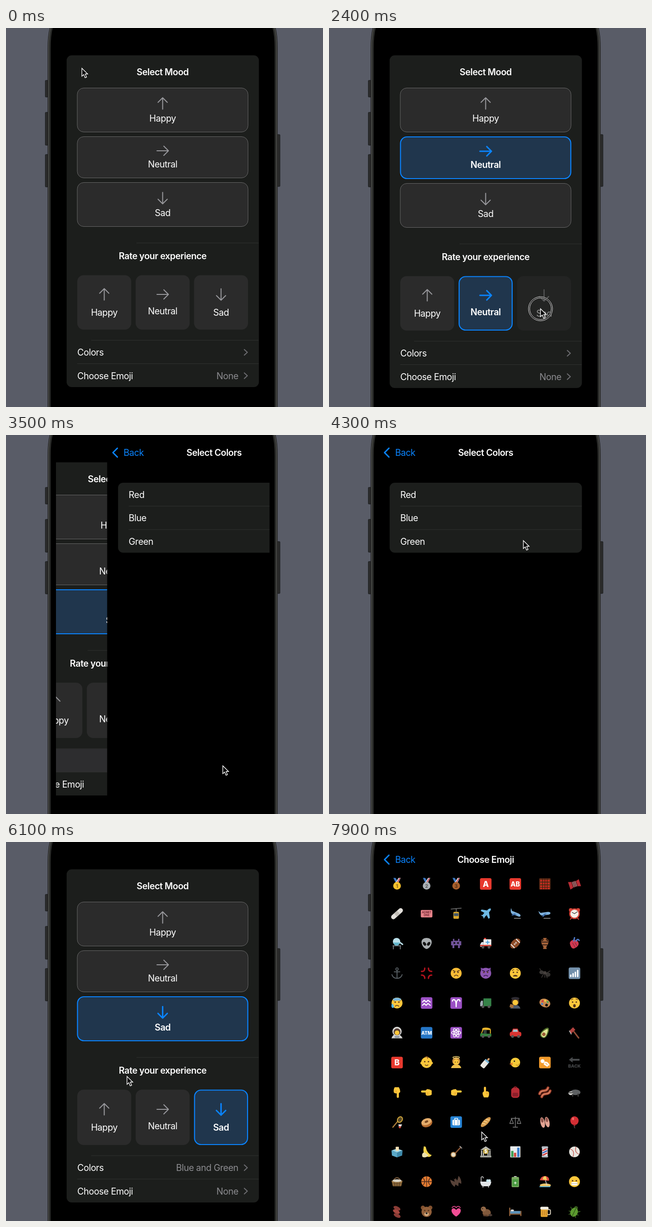
Animation of 685 by 818 pixels, one loop 8 s. Source, as an HTML page:

```html
<!DOCTYPE html>
<html lang="en">
<head>
<meta charset="utf-8">
<title>Mood picker</title>
<style>
html, body { margin: 0; height: 100%; overflow: hidden; background: #595c67; }
svg { display: block; width: 100vw; height: 100vh; }
text { font: 400 19.4px Inter, "Open Sans", sans-serif; letter-spacing: -.45px; fill: #fff; }
.bold { font-weight: 600; }
.mid { text-anchor: middle; }
.end { text-anchor: end; fill: #8c8c90; }
.blue { fill: #0a84ff; }
.icon { font-weight: 800; letter-spacing: 0; text-anchor: middle; }
.line { fill: none; stroke-linecap: round; stroke-linejoin: round; }
</style>
</head>
<body>
<svg viewBox="0 0 685 818">
  <defs><clipPath id="screen"><path d="M108 0H570V818H108Z"/></clipPath></defs>
  <g id="phone"></g>
  <g clip-path="url(#screen)">
    <g id="list"></g><g id="colors"></g><g id="emoji"></g>
  </g>
  <g id="pointer">
    <g id="ring" fill="none" stroke="#eee">
      <circle r="24.5" stroke="#111" stroke-width="4"/><circle r="26"/><circle r="23.3"/>
    </g>
    <path d="M0 0V17L4 13.4 6.9 20.4 10 19.1 7.1 12.3H12.4Z" fill="#000" stroke="#fff" stroke-width="1.4"/>
  </g>
</svg>
<script>
const $ = id => document.getElementById(id);
const p = (d, f) => `<path d="${d}" fill="${f}"/>`;
const l = (d, s, w = 2) => `<path class="line" d="${d}" stroke="${s}" stroke-width="${w}"/>`;
const e = (x, y, a, b, f) => `<ellipse cx="${x}" cy="${y}" rx="${a}" ry="${b}" fill="${f}"/>`;
const c = (x, y, a, f) => e(x, y, a, a, f);
const r = (x, y, w, h, f, rx = 1, more = '') =>
  `<rect x="${x}" y="${y}" width="${w}" height="${h}" rx="${rx}" fill="${f}" ${more}/>`;
const g = (move, body) => `<g transform="${move}">${body}</g>`;
const text = (s, x, y, cls = '') => `<text x="${x}" y="${y + 7}" class="${cls}">${s}</text>`;
const BLUE = '#0a84ff', SHEET = '#1c1e1c', RULE = '#303230', MID = 338.5;
const rule = (x, y) => r(x, y - .5, 546 - x, 1, RULE, 0);

/* phone body */
const shell = i => `M${90 + i} 830V45Q${90 + i} 15 ${95 + i} -2H${582 - i}Q${587 - i} 15 ${587 - i} 45V830Z`;
const button = (x, y, h) => r(x, y, 6, h, '#2b2b2b', 1, 'stroke="#17181a"');
$('phone').innerHTML = r(0, 0, 685, 818, '#595c67', 0) +
  button(85, 113, 36) + button(85, 182, 71) + button(85, 273, 70) + button(586, 230, 112) +
  p(shell(0), '#111') + p(shell(1), '#555653') + p(shell(2.5), '#2b2c2a') + p(shell(6.5), '#000');

/* mood list */
const MOODS = ['Happy', 'Neutral', 'Sad'];
const ARROW = 'M0 12.3V-12.3M-10 -2.5L0 -12.5L10 -2.5';
function arrow(i, x, y, on) {
  return g(`translate(${x} ${y}) rotate(${i * 90})`, l(ARROW, on ? BLUE : '#98989c', on ? 3.1 : 2.1));
}
function card(i, on, x, y, w, h, edge, iconY, textY, dim) {
  const line = on ? `stroke="${BLUE}" stroke-width="2.2"` : edge ? 'stroke="#686868"' : '';
  const pad = on ? 1 : edge ? .5 : 0, cx = x + w / 2;
  return `<g opacity="${dim ? .5 : 1}">` +
    r(x + pad, y + pad, w - 2 * pad, h - 2 * pad, on ? '#20364d' : '#2b2b2b', 14, line) +
    arrow(i, cx, iconY, on) + text(MOODS[i], cx, textY, on ? 'mid bold' : 'mid') + '</g>';
}
const chevron = y => l(`M515 ${y - 6}l6.5 6-6.5 6`, '#6c6c70', 2.2);

function listPage({ sel, press, colors, glow }) {
  const grow = sel < 0 ? 0 : sel === 1 ? 2 : 1, tall = sel === 0 || sel === 2 ? 2 : 0;
  const low = grow + tall;
  let s = r(131, 59, 415.5, 716 + low, SHEET, 11) + text('Select Mood', MID, 95, 'mid bold');
  let y = 129;
  MOODS.forEach((m, i) => {
    const on = sel === i, add = on ? grow : 0, h = (i === 1 ? 90 : 96) + add;
    s += card(i, on, 153.5, y, 370, h, true, y + (i === 1 ? 31 : 34) + add / 2, y + (i === 1 ? 60 : 66) + add / 2, press === 'top' + i);
    y += h + 9;
  });
  s += rule(282, 464 + grow) + text('Rate your experience', MID, 492 + grow, 'mid bold');
  const mid = 575 + grow + tall / 2;
  MOODS.forEach((m, i) => {
    s += card(i, sel === i, 154 + i * 126.2, 533.5 + grow, 116.6, 117.5 + tall, false,
      mid, mid + (i === 1 ? 36 : 39), press === 'rate' + i);
  });
  s += rule(184, 674 + low) + r(131, 674.5 + low, 415.5, 50, '#2d2d2f', 0, `opacity="${glow}"`) +
    rule(154, 724.5 + low) + text('Colors', 154, 700 + low) + text(colors, 502, 700 + low, 'end') + chevron(700 + low) +
    text('Choose Emoji', 154, 750.5 + low) + text('None', 502, 750.5 + low, 'end') + chevron(750.5 + low);
  return s;
}

/* pushed pages */
const navBar = (title, dim) => r(107.5, 0, 463, 818, '#000', 0) +
  `<g opacity="${dim ? .4 : 1}">` + l('M129.5 28.5L120 38 129.5 47.5', BLUE, 3) + text('Back', 143, 38, 'blue') + '</g>' +
  text(title, MID, 38, 'mid bold');

function colorPage({ press, green, blue }) {
  const tick = y => l(`M505 ${y + 1}l5.5 6 9.5-14`, BLUE, 2.2);
  const row = { green: 204, blue: 153.5 }[press];
  return navBar('Select Colors', press === 'back') + r(131, 103, 415.5, 151, SHEET, 11) +
    (row ? r(131, row, 415.5, 50, '#2d2d2f', 8) : '') + rule(154, 153.5) + rule(154, 204) +
    ['Red', 'Blue', 'Green'].map((s, i) => text(s, 154, 129 + i * 50.4)).join('') +
    (blue ? tick(179) : '') + (green ? tick(229.5) : '');
}

/* emoji, each drawn around 0,0 */
const GOLD = '#fdc73b', INK = '#54351d';
const t = (s, size, f, y) => `<text class="icon" y="${y}" style="font-size:${size}px;fill:${f}">${s}</text>`;
const eyes = c(-4, -2, 1.6, INK) + c(4, -2, 1.6, INK);
const face = (more, f = GOLD) => c(0, 0, 11.8, f) + eyes + more;
const badge = (f, more) => r(-12.5, -12.5, 25, 25, f, 3.5) + more;
const medal = (f, n) => p('M-8-13h5L3-3H-3Z', '#3c79c4') + p('M8-13H3L-3-3H3Z', '#d6e0ea') + l('M6-12L1-4', '#d0434d', 2) + c(0, 4, 8.3, f) + t(n, 10, '#0007', 8);
const wheels = c(-6, 8, 3, '#555') + c(7, 8, 3, '#555');
const hand = turn => g(`rotate(${turn})`, r(-4, -12, 4.6, 16, GOLD, 2.3) + p('M-4-2L-7 1Q-7 6-4 11H5Q8 7 7 0 5-3 0-2Z', GOLD) + l('M1.5 0v4M4.5 1v3', '#d9952b', 1));
const ball = (f, line, d) => c(0, 0, 11.5, f) + l(d, line, 1.3);
const person = (hair, coat) => p('M-11 12Q-9 4 0 4T11 12Z', coat) + c(0, -3, 8.5, hair) + c(0, -1, 6, GOLD);
const jet = p('M11-11Q7-12 3-7L-9-9-11-6-3-2-7 3-11 3-6 6-4 11-2 7 2 3 6 11 9 9 7-3Q12-8 11-11Z', '#6db9e4');
const sideJet = turn => g(`rotate(${turn})`, p('M-13-8L-9-3H7Q13-2 12 1T4 3H-7Q-12 1-13-8Z', '#7fb2dc') + p('M-2 0H4L-4 6H-7Z', '#3f6fae')) + r(-3, 9, 15, 2, '#777');
const heart = f => p('M0 11C-22-3-8-18 0-6 8-18 22-3 0 11Z', f);
const icons = [];
const add = (...row) => icons.push(...row);

add(medal('#f6c02c', 1), medal('#aab0b5', 2), medal('#a85e2b', 3),
  badge('#e8392e', t('A', 17, '#fff', 6)), badge('#e8392e', t('AB', 14, '#fff', 5)),
  r(-12, -12, 24, 24, '#6b2f18', 1) + l('M-9-7H9M-9-1H9M-9 5H9M-9 10H9', '#c92c20', 3) + l('M-5-11V11M0-11V11M5-11V11', '#3b1b10', 1.2),
  g('rotate(-18)', p('M-12-8L-5-6V7L-12 9Z', '#b92d35') + p('M12-7L5-5V7L12 9Z', '#b92d35') + r(-5, -6, 10, 13, '#5d1a20') + l('M-3-5V6M0-5V6M3-5V6', '#d9cac2', 1)));
add(g('rotate(-42)', r(-15.5, -4.8, 31, 9.6, '#e3e0db', 4.8) + r(-4.5, -4.5, 9, 9, '#c3bfb8')),
  r(-12.5, -8, 25, 16, '#e8848b', 2) + t('ADMIT', 6, '#7d2f3a', -1) + t('ONE', 6, '#7d2f3a', 5),
  l('M-11-10L11-12M0-10V-3', '#777', 1.6) + r(-6, -4, 12, 15, '#d9a72b', 2) + r(-5, -1, 10, 6, '#44586b'),
  jet, sideJet(22), sideJet(-8),
  c(-8, -8, 4, '#d34236') + c(8, -8, 4, '#d34236') + l('M-7 10L-9 12M7 10L9 12', '#d34236', 2) + c(0, 0, 11.5, '#d34236') + c(0, 0, 8.8, '#f3efe8') + l('M0 0L-5-3M0 0L6-4', '#333', 1.3));
add(c(-1, -4, 8, '#b9dfe9') + l('M5-3L12 2', '#b9dfe9', 3) + p('M-8-2H6Q4 5-1 5T-8-2Z', '#63b5cb') + l('M-9 5H8M-8 5V12M7 5V12', '#8c9298', 1.5),
  p('M0 12C-6 11-11 3-11-3-11-15 11-15 11-3 11 3 6 11 0 12Z', '#a9aeb0') + g('rotate(-35)', e(-4, -2, 3, 4.5, '#151515')) + g('rotate(35)', e(4, -2, 3, 4.5, '#151515')),
  p('M-7-10h3v4H4v-4h3v5h4v9H8v6H4V4H-4v6H-8V4h-3V-5h4Z', '#705398') + c(-4, -1, 2, '#111') + c(4, -1, 2, '#111'),
  r(-5, -9, 17, 15, '#eee') + p('M-5-3H-9L-12 2V7H-5Z', '#d9e1e6') + r(-12, 3, 24, 3, '#e0463a', 0) + l('M4-6V1M.5-2.5H7.5', '#4aa2dc', 2) + r(-4, -12, 5, 3, '#e0463a') + wheels,
  g('rotate(-45)', e(0, 0, 13, 8, '#8d4a26') + l('M-8-5V5M8-5V5', '#eee', 2) + l('M-4 0H4M-2-2V2M2-2V2', '#eee', 1)),
  p('M-4-12H4L2-8Q9-5 7 1L3 8 4 12H-4L-3 8-7 1Q-9-5-2-8Z', '#a4633a') + l('M-6-3H6M-5 3H5', '#38231a', 1.8) + l('M-3-9Q-9-9-7-2M3-9Q9-9 7-2', '#784425', 1.5),
  g('rotate(15)', p('M-7-5C0-12 13-5 8 4 4 11-1 14-6 8S-11 0-7-5Z', '#d03a50') + l('M-3-5V-12M2-6Q4-13 8-9', '#4b76c0', 3) + l('M-4 0L4 8M1-2L6 3', '#802640', 1.2)));
add(l('M0-6V11M-6-3H6M-11 3Q-9 11 0 11T11 3', '#565d62', 2) + '<circle cy="-9" r="2.6" fill="none" stroke="#565d62" stroke-width="1.8"/>',
  l('M-11-4Q-4-3-4-11M4-11Q4-4 11-4M11 4Q4 4 4 11M-4 11Q-4 4-11 4', '#b3131d', 3),
  face(l('M-4 6Q0 2 4 6M-7-6L-2-4M7-6L2-4', INK, 1.6), '#f9bb35'),
  p('M-11-12Q-5-11-2-8L-10-3ZM11-12Q5-11 2-8L10-3Z', '#74449b') + face(l('M-4 6Q0 3 4 6M-7-6L-2-4M7-6L2-4', '#301747', 1.7), '#8c56b1'),
  face(l('M-4 6Q0 3 4 6Z', INK, 2) + l('M-7-6L-3-8M7-6L3-8', INK, 1.3)),
  e(-7, -2, 5, 4, '#3a3735') + c(0, -1, 3.5, '#443f3c') + e(7, 3, 5, 4.5, '#33312f') + l('M-2 0L-7 9M0 0V9M2 0L5 10M-8-5L-11-10M3 0L11-5', '#4a4542', 1.3),
  badge('#7390ab', l('M-8 7V4M-3 7V1M2 7V-2M7 7V-6', '#fff', 3.2)));
add(face(l('M-4 7Q0 3 4 7M-7-5L-2-8M7-5L2-8', INK, 1.6) + p('M-11 10Q-14 6-10 1-6 6-7 9T-11 10Z', '#51b4ea') + p('M-9-9Q0-14 9-9L7-5H-7Z', '#7ab6db')),
  badge('#9b50c4', l('M-9-2L-5-6-1-2 3-6 8-2M-9 5L-5 1-1 5 3 1 8 5', '#fff', 2.2)),
  badge('#9b50c4', l('M-8-4Q-8-8-4-7T0 8Q0-6 4-7T8-4', '#fff', 2.4)),
  r(-5, -10, 17, 17, '#358248') + p('M-12 0L-10-5H-6V7H-12Z', '#9fabb1') + wheels,
  person('#49321f', '#505b6b') + e(0, -10, 9, 3, '#2e2b32') + g('translate(-8 7) rotate(15)', r(-4, -4, 8, 7, '#a9713a')),
  g('rotate(20)', e(0, 0, 12, 9, '#c98a50') + c(-6, -2, 2.2, '#d83c38') + c(-1, -5, 2.2, '#f4d23d') + c(5, -4, 2.2, '#47a95a') + c(-5, 4, 2.2, '#3f7ed0') + c(5, 3, 3, '#111')),
  face(e(0, 6, 2.8, 3.4, INK) + l('M-7-7L-3-9M7-7L3-9', INK, 1.3)));
add(p('M-12 12Q-9 2 0 3T12 12Z', '#d0d0ce') + c(0, -3, 10, '#dadad8') + c(0, -2, 7.5, '#584237') + c(0, 0, 5, GOLD) + r(-5, 7, 10, 4, '#8995a0'),
  badge('#2576c6', t('ATM', 10, '#fff', 4)),
  badge('#9b50c4', [0, 60, 120].map(a => g(`rotate(${a})`, '<ellipse rx="10" ry="4" fill="none" stroke="#fff" stroke-width="1.5"/>')).join('') + c(0, 0, 2, '#fff')),
  p('M-7-10Q2-13 10-9L11-6H-8Z', '#e9b52c') + l('M-6-7L-9 1M10-6V1', '#e9b52c', 2) + r(-5, -6, 7, 9, '#36423b') + p('M-12 2Q-8-1-5 2H12V8H-12Z', '#35833f') + wheels,
  p('M-9 0L-5-9H5L9 0Z', '#d93431') + p('M-6-1L-4-7H4L6-1Z', '#a8c4d0') + r(-12, -2, 25, 10, '#d93431', 4) + wheels,
  g('rotate(35)', p('M0-13Q5-12 7 0T0 12-7 0 0-13Z', '#53702b') + p('M0-10Q3-9 5 1T0 10-5 1 0-10Z', '#e0e596') + c(0, 4, 3.7, '#9a5b32')),
  l('M-4-6L9 11', '#8f4b36', 3.2) + p('M-11-4L-3-12 2-6-3-3-7 3Z', '#b3423f') + l('M-11-4L-7 3', '#bbb', 1.6));
add(badge('#e8392e', t('B', 17, '#fff', 6)),
  c(-11, 1, 2.5, GOLD) + c(11, 1, 2.5, GOLD) + face(l('M-3 5Q0 8 3 5', INK, 1.6) + l('M-2-12Q3-14 2-9', '#a0662d', 2)),
  person('#c98c3c', '#eec04a') + '<ellipse cy="-11" rx="7" ry="2" fill="none" stroke="#f7dc78" stroke-width="1.5"/>' + c(-2, -1, 1, INK) + c(3, -1, 1, INK),
  g('rotate(40)', r(-5.5, -4, 11, 17, '#e8e7e2', 3) + r(-5.5, -6, 11, 4, '#79b7da') + r(-2, -12, 4, 6, '#dba16d', 2)),
  c(0, 0, 10.5, '#f4c938') + p('M-6 0L-13 3-6 6Z', '#e67b2b') + c(-2, -3, 1.6, '#222') + l('M2 5Q6 8 8 3', '#d19c27', 2),
  badge('#f29b2c', c(-5, -3, 4.2, '#fff') + l('M0 0Q5-1 8 5M-1 3L5 7', '#fff', 3.5)),
  p('M-12-6L-4-12V-8H11V-4H-4V0Z', '#47494b') + t('BACK', 9.5, '#47494b', 11));
add(hand(180), g('scale(-1 1)', hand(90)), hand(90), hand(0),
  l('M-4-9Q0-15 4-9', '#8b1f2a', 2) + r(-9, -10, 18, 22, '#b72b35', 6) + r(-6, 1, 12, 8, '#8b1f2a', 2),
  g('rotate(-35)', l('M-11-4Q-6-8 0-4T11-4M-11 4Q-6 0 0 4T11 4', '#a7442f', 6) + l('M-11-4Q-6-8 0-4T11-4M-11 4Q-6 0 0 4T11 4', '#e9a27d', 1.4)),
  e(2, 0, 11, 6, '#5d6062') + e(-8, 2, 5, 4, '#d0d0ce') + l('M-11 1H-4', '#333', 2) + l('M-4 5V8M8 4V8', '#333', 3));
add(l('M1-1L-9 11', '#b0813c', 2.5) + g('rotate(35)', e(2, -8, 6, 7.5, '#d7ab3d') + e(2, -8, 4, 5.5, '#564726')) + p('M3 5L11 5 8 11H4Z', '#eee') + c(6, 11, 2.4, '#d04a3d'),
  g('rotate(-20)', e(0, 2, 12, 9, '#b66d31') + e(0, -1, 11.5, 7, '#e5ad6c') + e(0, -1, 4, 2.3, '#7a4922')),
  badge('#2583d5', r(-8, -5, 16, 12, '#fff', 2) + l('M-3-5V-8H3V-5', '#fff', 1.6) + l('M-4-4V6M4-4V6', '#2583d5', 1)),
  g('rotate(-45)', e(0, 0, 14, 5.5, '#d59a4d') + l('M-7-3L-4 2M-1-3L2 2M5-3L8 2', '#f5d28e', 2)),
  l('M0-11V10M-5 11H5M-9-8H9M-8-7L-12 3H-4ZM8-7L4 3H12Z', '#858585', 1.3),
  g('rotate(-12)', e(-5, 0, 4.8, 11.5, '#e4a493') + e(-5, -5, 2.6, 5, '#8e544b') + e(5, 1, 4.8, 11.5, '#e4a493') + e(5, -4, 2.6, 5, '#8e544b')),
  e(0, -3, 9, 9.5, '#d42e34') + p('M0 5L3 8H-3Z', '#a02028') + l('M0 8Q-2 10 1 13', '#888', 1) + e(-3, -7, 2, 3, '#ee7069'));
add(p('M-12-3L0-7 12-3 0 2Z', '#94d1e6') + p('M-12-3L0 2V12L-11 8Z', '#5aa9c8') + p('M12-3L0 2V12L11 8Z', '#3d89aa') + r(-3, -11, 7, 9, '#f1dfb5'),
  p('M-6-12L-2-11Q1 4 11 7 7 14-2 9-9 3-6-12Z', '#f4d248') + p('M-5 1Q-12 3-9 11 0 14 4 7Z', '#eee2ad'),
  l('M-4 5L10-10', '#825031', 2.8) + c(-6, 6, 6, '#b98b52') + c(-6, 6, 4, '#eadfc9') + l('M8-12L12-8', '#999', 2),
  p('M-12-4L0-12 12-4Z', '#b9bab4') + r(-12, 8, 24, 4, '#a6a79f') + l('M-9-2V7M9-2V7M-5-2V7M5-2V7', '#ccccc4', 2.5) + c(0, -1, 6, '#bda03b') + t('$', 10, '#fff', 2.5),
  r(-11, -12, 22, 24, '#e8ecef', 1) + r(-9, -2, 5, 13, '#3ca053', 0) + r(-3, 2, 5, 9, '#d54a3e', 0) + r(4, -9, 5, 20, '#3a7cca', 0),
  r(-6, -8, 12, 17, '#eee', 1) + l('M-4-3L4-7M-4 7L4 3', '#d43c3c', 3) + l('M-4 2L4-2', '#3e67bd', 3) + r(-7, -12, 14, 5, '#b4bbc4', 2) + r(-7, 8, 14, 4, '#b4bbc4', 2),
  ball('#e7e5df', '#c14a43', 'M-9-6Q1-3-3 10M3-10Q0 2 10 5'));
add(l('M-9-1Q0-16 9-1', '#806040', 1.8) + p('M-12-2H12L9 10H-9Z', '#94703f') + e(0, -2, 10, 3, '#d8d2c4') + l('M-10 4H10M-8 8H8M-5 2V9M0 2V9M5 2V9', '#573d22', 1.2),
  ball('#e57c31', '#46281d', 'M0-11V11M-11 0H11M-8-8Q0 0-8 8M8-8Q0 0 8 8'),
  g('rotate(-25)', p('M-2-8L0-5 2-8 3-1 10-9Q13 0 8 9L4 4 0 11-4 5-8 9Q-13 0-10-9L-3-1Z', '#574238')),
  l('M-10 1V-9Q-7-13-5-8', '#aaa', 2) + p('M-12 0H12Q11 10 5 10H-5Q-11 10-12 0Z', '#e2e5e7') + l('M-6 10V12M6 10V12', '#bbb', 2) + c(4, -2, 3, '#c0e2ee') + c(8, -2, 3, '#d5edf4'),
  r(-3, -12, 6, 4, '#bbb') + r(-8, -10, 16, 22, '#78a85e', 2) + r(-6, -5, 12, 15, '#4a9b42') + t('+', 11, '#dfefd9', 6),
  e(1, 8, 12, 4, '#ebc66d') + l('M0-7L4 7', '#d7d7d7', 1.5) + p('M-11-3Q-8-13 2-12 10-10 9-2Z', '#e24f42') + p('M-5-5Q-3-12 1-12 4-9 4-3Z', '#f3d361') + l('M-11 11H11', '#54add3', 2),
  face(r(-7, 1, 14, 7, '#fff', 3) + l('M-7 4.5H7', '#b8a277', 1)));
add(g('rotate(25)', e(-3, -6, 8, 4, '#8a3c36') + e(-1, 1, 8, 4, '#a5463e') + e(4, 8, 8, 4, '#8a3c36')),
  c(-8, -8, 4.5, '#80502e') + c(8, -8, 4.5, '#80502e') + c(0, 1, 11, '#93603a') + e(0, 6, 5, 4, '#d3ab7f') + eyes + c(0, 4, 2, '#222'),
  g('translate(0 2) scale(.85)', heart('#f04d94')) + l('M-9-8Q-4-14 0-8 4-14 9-8', '#f04d94', 1.6),
  e(2, 3, 9, 8, '#80583b') + c(-5, -5, 5.5, '#946a48') + c(-7, -6, 1, '#111') + e(10, 8, 4, 2.5, '#493a32') + l('M-4 9H3', '#5b3e2b', 3),
  l('M-12-7V9M12 0V9', '#9a673e', 2.4) + r(-11, -1, 22, 6, '#5c91b8') + r(-10, -4, 7, 4, '#ddd', 2) + l('M-11 6H11', '#9a673e', 2),
  '<rect x="5" y="-4" width="7" height="11" rx="3" fill="none" stroke="#d8cfbd" stroke-width="2"/>' + r(-9, -6, 15, 18, '#e6a631', 2) + l('M-5-1V8M-1-1V8M3-1V8', '#bc792a', 1.3) + l('M-7-7H5', '#f2eee3', 6),
  g('rotate(25)', l('M-11-5L-6-1M11-5L6-1M-11 4H11M-8 11L-4 6M8 11L4 6', '#3c6422', 1.6) + c(0, -8, 4, '#35571d') + e(0, 2, 8, 10, '#5c9a2f') + l('M0-7V11', '#2e5119', 1.3)));

$('emoji').innerHTML = navBar('Choose Emoji') +
  icons.map((s, i) => g(`translate(${147 + i % 7 * 63.9} ${90.5 + (i / 7 | 0) * 64.25})`, s)).join('');

/* timeline: time, x, y of the pointer tip */
const LOOP = 8000;
const PATH = [[0, 164, 87], [100, 164, 87], [700, 300, 175], [1000, 300, 175], [1600, 320, 280], [1850, 320, 280],
  [2300, 457, 606], [2600, 457, 606], [3150, 468.5, 714], [3500, 468.5, 714], [4250, 420, 228], [4480, 420, 228],
  [4700, 412, 180], [4880, 412, 180], [5200, 165, 38], [5500, 165, 38], [6100, 261.5, 506], [6500, 506, 701],
  [6650, 506, 701], [7000, 490.5, 756], [7410, 490.5, 756], [7880, 330, 626], [LOOP, 330, 626]];
const PRESSES = [[820, 950, 'top0'], [1650, 1760, 'top1'], [2350, 2590, 'rate2'], [3200, 3370, 'row'],
  [4340, 4460, 'green'], [4750, 4860, 'blue'], [5250, 5400, 'back'], [7050, 7250, 'row']];

function pointerAt(now) {
  const i = PATH.findIndex(k => k[0] > now), [t0, x0, y0] = PATH[i - 1], [t1, x1, y1] = PATH[i];
  const u = (now - t0) / (t1 - t0), k = u * u * (3 - 2 * u);
  return [x0 + (x1 - x0) * k, y0 + (y1 - y0) * k];
}
// critically damped spring from 0 to 1
function spring(ms) {
  const a = Math.max(0, ms) * .0243;
  return a > 10 ? 1 : 1 - (1 + a) * Math.exp(-a);
}
const cache = {};
function show(id, html) {
  if (cache[id] !== html) $(id).innerHTML = cache[id] = html;
}
const slide = (id, x) => $(id).setAttribute('transform', `translate(${x.toFixed(2)} 0)`);

function draw() {
  const now = performance.now() % LOOP;
  const press = (PRESSES.find(k => now >= k[0] && now < k[1]) || [])[2];
  const sel = now < 950 ? -1 : now < 1760 ? 0 : now < 2590 ? 1 : 2;
  const popped = spring(now - 5420), first = spring(now - 3388) - popped, second = spring(now - 7375);
  const green = now >= 4460, blue = now >= 4860;
  const glow = now < 3200 ? 0 : +(1 - popped).toFixed(2);
  show('list', listPage({ sel, press, glow, colors: green && blue ? 'Blue and Green' : '' }));
  show('colors', colorPage({ press, green, blue }));
  slide('list', -139 * (first + second));
  slide('colors', 462 * (1 - first));
  slide('emoji', 462 * (1 - second));
  $('pointer').setAttribute('transform', `translate(${pointerAt(now).join(' ')})`);
  $('ring').setAttribute('visibility', press ? 'visible' : 'hidden');
  requestAnimationFrame(draw);
}
draw();
</script>
</body>
</html>
```
